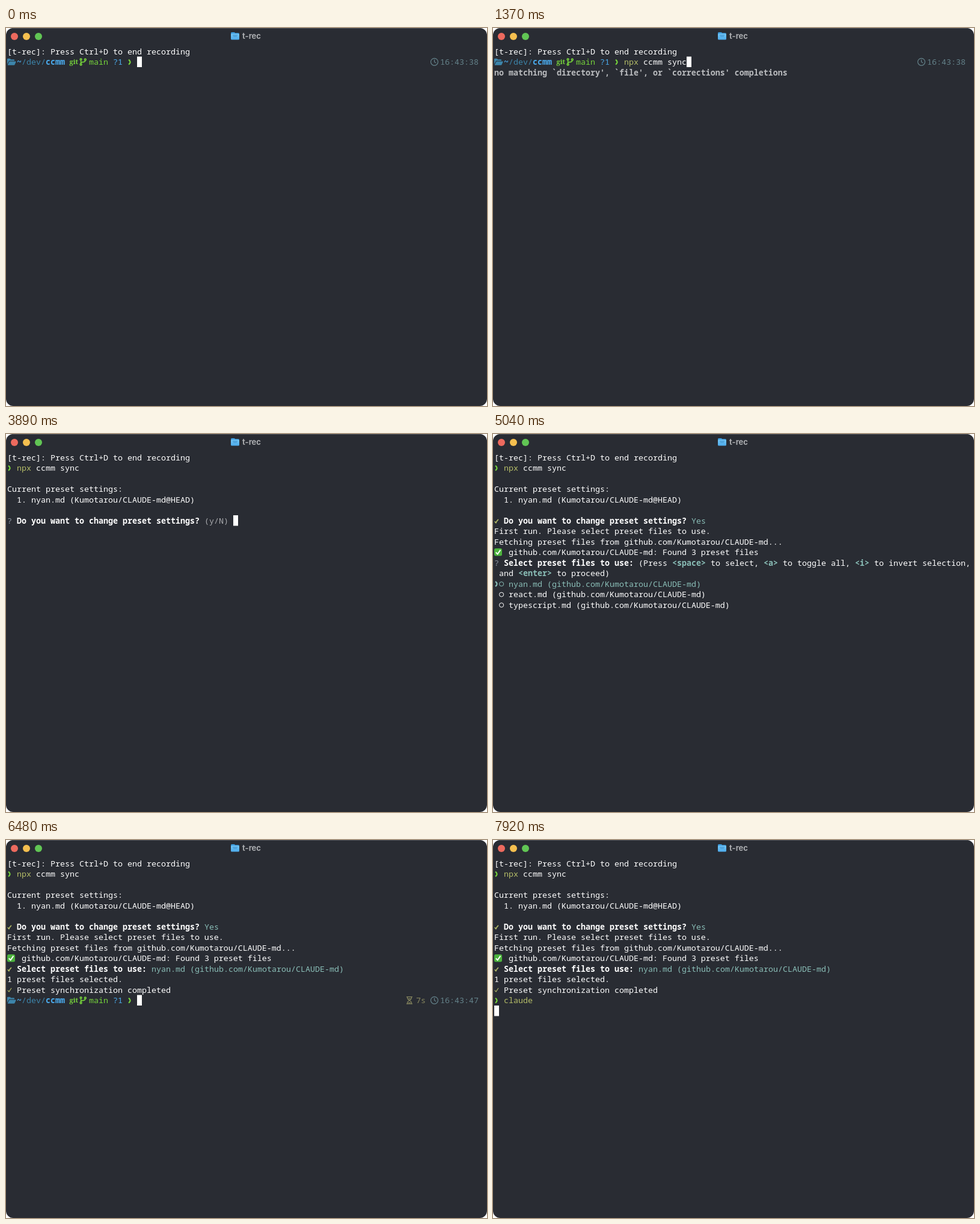
An HTML page with a canvas for the animation above (8000 ms loop, 800 px wide and 628 px high).

```html
<!DOCTYPE html>
<html lang="en">
<head>
<meta charset="utf-8">
<title>Terminal</title>
<style>
html, body { margin: 0; width: 100%; height: 100%; overflow: hidden; background: #fff; }
canvas { display: block; }
</style>
</head>
<body>
<canvas id="stage" width="800" height="628"></canvas>
<script>
const ctx = document.getElementById('stage').getContext('2d');
const LOOP = 8000, CELL = 8, LINE = 17.5, LEFT = 2, TOP = 30;
const MONO = '13.333px "Noto Sans Mono", "DejaVu Sans Mono", monospace';
const BG = '#292c33', WHITE = '#ffffff', OLIVE = '#b5bd68', CYAN = '#8abeb7', RED = '#cc6666',
  DIM = '#a9abae', FAINT = '#666a70', BLUE = '#4badf0', DEEP = '#3d85ab', GREEN = '#76d43b',
  TEAL = '#64828a', SAND = '#87875f';
const REPO = 'github.com/Kumotarou/CLAUDE-md';

// Icons are drawn from the top left of their cell.
const ICONS = {
  chevron: { d: 'M2 5.2 Q4.6 7.2 4.6 9.2 Q4.6 11.2 2 13.2', w: 2.2 },
  heavyCheck: { d: 'M.8 10.2 L2.8 12.6 Q4.3 9.2 6.9 6.8', w: 1.6 },
  check: { d: 'M.8 9.6 L3 12 L7 6', w: 1.1 },
  ring: { d: 'M.5 9.2 a3.6 3.6 0 1 1 7.2 0 a3.6 3.6 0 1 1 -7.2 0', w: 1 },
  dot: { d: 'M2 9.2 a2.1 2.1 0 1 1 4.2 0 a2.1 2.1 0 1 1 -4.2 0' },
  folder: { d: 'M0 13 V4.3 Q0 3.2 1 3.2 H4.6 L6.2 4.8 H11 Q12 4.8 12 5.8 V7 H4 Q3 7 2.5 8 Z ' +
    'M.5 14.2 L3.2 8.7 Q3.5 8 4.2 8 H14.2 Q15 8 14.6 8.8 L12.5 13.4 Q12.1 14.2 11.2 14.2 Z' },
  branch: { d: 'M2.6 6.2 V12 M2.6 10.2 C3 8.2 9.8 10.4 9.8 6.4 ' +
    'M1.2 4.6 a1.4 1.4 0 1 1 2.8 0 a1.4 1.4 0 1 1 -2.8 0 ' +
    'M1.2 13 a1.4 1.4 0 1 1 2.8 0 a1.4 1.4 0 1 1 -2.8 0 ' +
    'M8.4 4.9 a1.4 1.4 0 1 1 2.8 0 a1.4 1.4 0 1 1 -2.8 0', w: 1.6 },
  clock: { d: 'M.5 8.8 a6 6 0 1 1 12 0 a6 6 0 1 1 -12 0 M6.5 5 V9 L9.2 10.6', w: 1.2 },
  hourglass: { d: 'M0 3.2 H10 M0 14.6 H10 M1.6 3.2 V5 Q1.6 6.8 5 8.9 Q8.4 6.8 8.4 5 V3.2 ' +
    'M1.6 14.6 V12.8 Q1.6 11 5 8.9 Q8.4 11 8.4 12.8 V14.6 M3 13 H7 M3.4 6.2 H6.6', w: 1.2 }
};
for (const shape of Object.values(ICONS)) shape.path = new Path2D(shape.d);

function icon(name, row, col, color) {
  const { path, w } = ICONS[name];
  ctx.save();
  ctx.translate(LEFT + col * CELL, TOP + row * LINE);
  ctx.fillStyle = ctx.strokeStyle = color;
  if (w) { ctx.lineWidth = w; ctx.stroke(path); } else ctx.fill(path);
  ctx.restore();
}

// Each span is a plain string or [text, color, bold].
function write(row, col, ...spans) {
  for (const span of spans) {
    const [text, color = WHITE, bold] = [].concat(span);
    ctx.font = (bold ? '600 ' : '') + MONO;
    ctx.fillStyle = color;
    ctx.fillText(text, LEFT + col * CELL, TOP + row * LINE + 13.6);
    col += text.length;
  }
}

function cursor(row, col) {
  ctx.fillStyle = WHITE;
  ctx.fillRect(LEFT + col * CELL, TOP + row * LINE, CELL, LINE);
}

function disc(x, y, r, color) {
  ctx.fillStyle = color;
  ctx.beginPath();
  ctx.arc(x, y, r, 0, 7);
  ctx.fill();
}

function box(x, y, w, h, r, color) {
  ctx.fillStyle = color;
  ctx.beginPath();
  ctx.roundRect(x, y, w, h, r);
  ctx.fill();
}

function drawWindow() {
  ctx.clearRect(0, 0, 800, 628);
  box(0, 0, 800, 628, 12, BG);
  box(10, 0, 780, 1, 0, '#4f5258');
  ['#ed6a5e', '#f5bf4f', '#61c554'].forEach((color, i) => disc(14 + 20 * i, 14, 6, color));

  box(374, 7, 7, 5, 1.5, '#3d9bdc');
  box(374, 8.2, 14, 4, 1.5, '#3d9bdc');
  const blue = ctx.createLinearGradient(0, 9, 0, 20);
  blue.addColorStop(0, '#76c8f7');
  blue.addColorStop(1, '#4aa9ea');
  box(374, 9.6, 14, 10, 1.5, blue);
  box(377, 11.5, 8, 1, 0, '#3c8fcb');
  box(378, 13.5, 6, 1, 0, '#3c8fcb');
  ctx.fillStyle = '#a9abae';
  ctx.font = 'bold 13px Inter, sans-serif';
  ctx.fillText('t-rec', 393, 18);
}

function prompt(row, time) {
  icon('folder', row, 0, DEEP);
  write(row, 2, ['~', BLUE, true], ['/dev/', DEEP], ['ccmm', BLUE, true]);
  ctx.font = 'bold 11px "Noto Serif", serif';
  ctx.fillStyle = GREEN;
  ctx.fillText('git', 105.5, TOP + row * LINE + 12.2);
  icon('branch', row, 15, GREEN);
  write(row, 17, ['main', GREEN], ' ', ['?1', BLUE]);
  icon('chevron', row, 25, GREEN);
  icon('clock', row, 88, TEAL);
  write(row, 90, [time, TEAL]);
}

function drawFirstPrompt(t) {
  prompt(1, '16:43:38');
  const count = t < 250 ? 0 : t < 530 ? 2 : t < 810 ? 3 : t < 1090 ? 6 : t < 1370 ? 10 : 13;
  const typed = 'npx ccmm sync'.slice(0, count);
  write(1, 27, count < 3 ? [typed, RED, true] : [typed.slice(0, 3), OLIVE], typed.slice(3, count));
  cursor(1, 27 + count);
  if (t >= 1090) write(2, 0, ["no matching `directory', `file', or `corrections' completions", '#b9bbbe', true]);
}

function drawQuestion(t) {
  write(3, 0, 'Current preset settings:');
  write(4, 2, '1. nyan.md (Kumotarou/CLAUDE-md@HEAD)');
  write(6, 2, ['Do you want to change preset settings?', WHITE, true]);
  if (t >= 4750) {
    icon('heavyCheck', 6, 0, OLIVE);
    write(6, 41, ['Yes', CYAN]);
    return;
  }
  const yes = t >= 4170;
  write(6, 0, ['?', '#8c959f']);
  write(6, 41, ['(y/N)', DIM], yes ? ' y' : '');
  cursor(6, yes ? 48 : 47);
}

function drawFetch(t) {
  write(7, 0, 'First run. Please select preset files to use.');
  write(8, 0, `Fetching preset files from ${REPO}...`);
  if (t < 5040) return cursor(9, 0);
  box(2, 190, 13, 12.5, 2.5, '#4db33d');
  ctx.strokeStyle = WHITE;
  ctx.lineWidth = 1.9;
  ctx.stroke(new Path2D('M4.8 196.6 L7.6 199.5 L12.4 192.6'));
  write(9, 3, `${REPO}: Found 3 preset files`);
  write(10, 2, ['Select preset files to use:', WHITE, true]);
}

function drawChoices(t) {
  const key = name => [`<${name}>`, CYAN, true];
  write(10, 0, ['?', '#8c959f']);
  write(10, 30, '(Press ', key('space'), ' to select, ', key('a'), ' to toggle all, ',
    key('i'), ' to invert selection,');
  write(11, 1, 'and ', key('enter'), ' to proceed)');
  icon('chevron', 12, 0, CYAN);
  ['nyan', 'react', 'typescript'].forEach((name, i) => {
    const color = i ? WHITE : CYAN;
    icon('ring', 12 + i, 1, color);
    write(12 + i, 3, [`${name}.md (${REPO})`, color]);
  });
  if (t >= 5320) icon('dot', 12, 1, CYAN);
}

function drawSecondPrompt(t) {
  prompt(13, '16:43:47');
  icon('hourglass', 13, 83, SAND);
  write(13, 85, ['7s', SAND]);
  const count = t < 6760 ? 0 : t < 7060 ? 1 : t < 7350 ? 3 : t < 7640 ? 4 : 6;
  const word = 'claude', col = 27 + count;
  write(13, 27, [word.slice(0, count), count < 6 ? RED : OLIVE, count < 6]);
  cursor(13, col);
  if (count) write(13, col, [word.slice(count), FAINT]);
  if (t >= 7060) {
    write(14, 0, ['command', '#b9bbbe', true]);
    write(15, 0, 'clang  clang++  clangd  classifier_tester  claude  clean-diff  clear  clippy-driver  clusterdb');
  }
}

function drawResult(t) {
  icon('heavyCheck', 10, 0, OLIVE);
  write(10, 30, [`nyan.md (${REPO})`, CYAN]);
  write(11, 0, '1 preset files selected.');
  if (t < 6170) return cursor(12, 0);
  icon('check', 12, 0, OLIVE);
  write(12, 2, 'Preset synchronization completed');
  if (t < 7920) return drawSecondPrompt(t);
  icon('chevron', 13, 0, GREEN);
  write(13, 2, ['claude', OLIVE]);
  cursor(14, 0);
}

function draw(t) {
  drawWindow();
  write(0, 0, '[t-rec]: Press Ctrl+D to end recording');
  if (t < 1660) return drawFirstPrompt(t);
  icon('chevron', 1, 0, GREEN);
  write(1, 2, ['npx', OLIVE], ' ccmm sync');
  if (t < 3610) return cursor(2, 0);
  drawQuestion(t);
  if (t < 4750) return;
  drawFetch(t);
  if (t < 5040) return;
  if (t < 5600) drawChoices(t);
  else drawResult(t);
}

let start;
function tick(now) {
  start ??= now;
  draw((now - start) % LOOP);
  requestAnimationFrame(tick);
}
requestAnimationFrame(tick);
</script>
</body>
</html>
```
